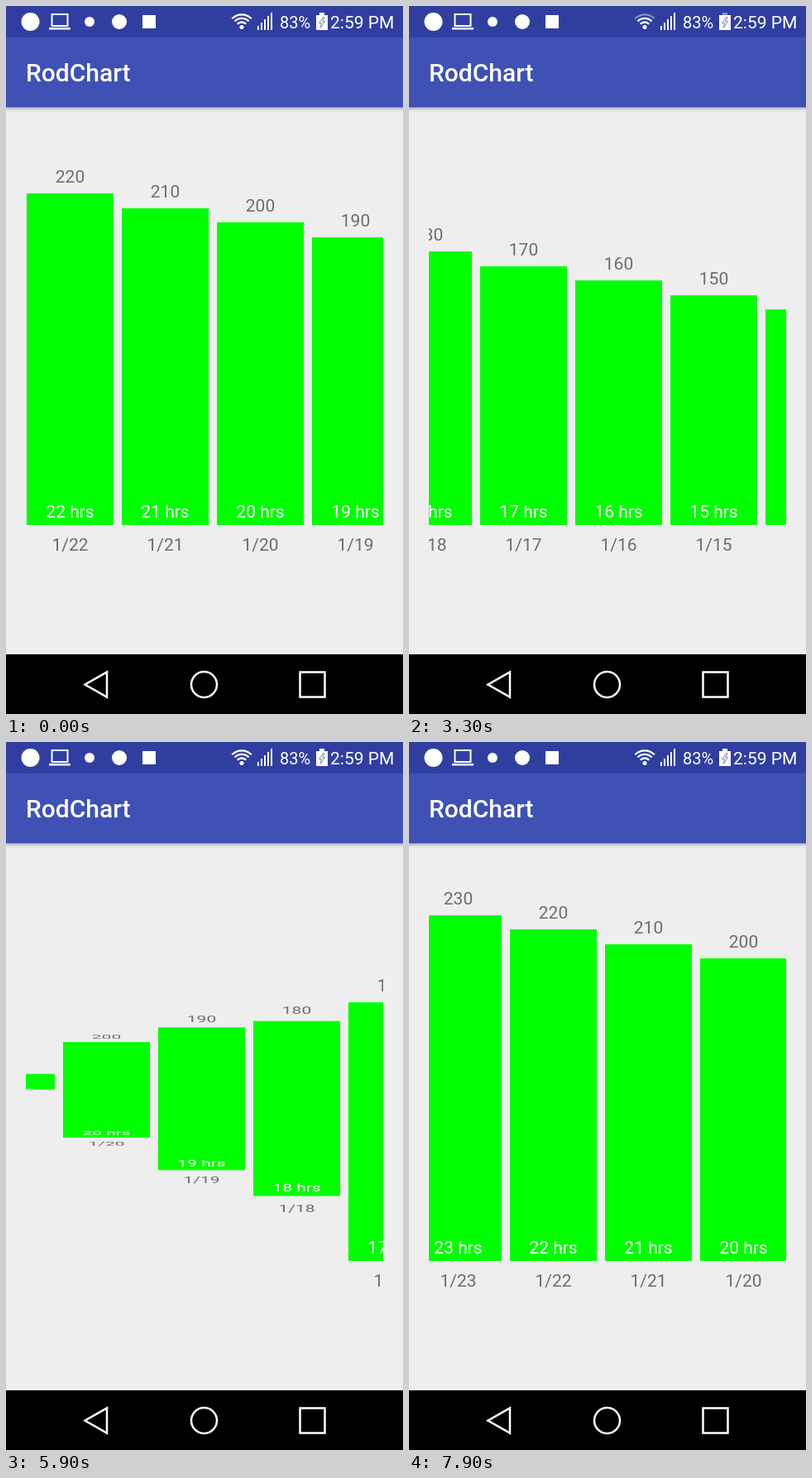
Write an HTML page that moves like this. It is 480 px wide and 854 px high and loops after 8000 ms.

```html
<!DOCTYPE html>
<html lang="en">
<head>
<meta charset="utf-8">
<title>Bar chart</title>
<style>
  html, body { margin: 0; width: 100%; height: 100%; overflow: hidden; background: #eee; }
  svg { display: block; width: 480px; height: 854px; }
  text { font: 21px Roboto, sans-serif; }
  .bar text { text-anchor: middle; fill: #6d6d6d; }
  .bar .hours { fill: #fff; }
  .line { fill: none; stroke: #fff; }
</style>
</head>
<body>
<svg viewBox="0 0 480 854">
  <defs>
    <clipPath id="viewport"><rect x="24" y="146" width="432" height="525"/></clipPath>
    <linearGradient id="shade" x2="0" y2="1">
      <stop stop-opacity=".32"/><stop offset=".45" stop-opacity=".1"/><stop offset="1" stop-opacity="0"/>
    </linearGradient>
  </defs>
  <rect width="480" height="854" fill="#eee"/>

  <g clip-path="url(#viewport)">
    <g id="bars"></g>
    <path id="glow" d="M0 146H14Q28 408.5 14 671H0z" fill="#3f51b5"/>
  </g>

  <rect y="122" width="480" height="6" fill="url(#shade)"/>
  <rect y="38" width="480" height="84" fill="#3f51b5"/>
  <rect width="480" height="38" fill="#303f9f"/>
  <text x="24" y="91" fill="#fff" style="font-size:30px;font-weight:500">RodChart</text>

  <g fill="#fff">
    <circle cx="29.500" cy="19" r="11"/>
    <path d="M52 26h26v2.500H52z"/>
    <rect class="line" x="55.500" y="10" width="19" height="14" stroke-width="2"/>
    <circle cx="101" cy="19" r="6"/>
    <circle cx="137" cy="19" r="9"/>
    <rect x="165" y="11" width="16" height="16"/>
    <circle cx="285" cy="25.500" r="2.500"/>
    <g class="line" stroke-width="2.300">
      <path d="M279.700 21.700a7.500 7.500 0 0 1 10.600 0M276.500 18.500a12 12 0 0 1 17 0"/>
      <path id="wifi" d="M273.300 15.300a16.500 16.500 0 0 1 23.400 0"/>
    </g>
    <path d="M304 29v-5h2v5zM308 29v-9h2v9zM312 29v-13h2v13zM316 29v-17h2v17zM320 29v-21h2v21z"/>
    <text x="331" y="27" style="font-size:20px">83%</text>
    <rect id="tip" x="379" y="8" width="6" height="3"/>
    <rect x="375" y="11" width="14" height="18"/>
    <path d="M383.500 13.500l-5 7h3l-1.500 6 5.500-8h-3l2.500-5z" fill="none" stroke="#7d86bf"/>
    <text x="392" y="27">2:59 PM</text>
  </g>

  <rect y="782" width="480" height="72"/>
  <g class="line" stroke-width="2.500">
    <path d="M122 803.500v30L95.500 818.500z"/>
    <circle cx="239.500" cy="818.500" r="15.500"/>
    <rect x="355.500" y="803.500" width="30" height="30"/>
  </g>
</svg>

<script>
const LOOP = 8000, STEP = 100, GROW = 800;
const COUNT = 24, PITCH = 115, WIDTH = 105, LEFT = 24, MIDDLE = 408.5, BASE = 626;

// Scroll offset of the list: [time, px]
const path = [
  [0, 229], [1600, 229], [1700, 90], [1780, 0], [2600, 0], [2900, 420], [3150, 715],
  [3300, 743], [3500, 1250], [3750, 2050], [3950, 2130], [4020, 2040], [4093, 1830],
  [4166, 1715], [4244, 1600], [4290, 1485], [4300, 1397], [4400, 1150], [4550, 1000],
  [4800, 880], [5380, 850], [5426, 795], [5500, 680], [5594, 565], [5785, 450],
  [5900, 415], [6340, 415], [6410, 335], [6506, 220], [6579, 105], [6630, 0],
  [7600, 0], [7700, 30], [7800, 95], [7900, 132], [8000, 132]
];
const blinks = [100, 600, 1100, 1700, 2200, 2700, 3200, 3700, 4200, 4700, 5200, 5700, 6400, 7100];

const secant = i => (path[i + 1][1] - path[i][1]) / (path[i + 1][0] - path[i][0]);
const slopes = path.map((_, i) => {
  if (!i || i === path.length - 1) return 0;
  const a = secant(i - 1), b = secant(i);
  return a * b > 0 ? 2 * a * b / (a + b) : 0;
});

// Monotone cubic through the path points
function scrollAt(t) {
  let i = 0;
  while (i < path.length - 2 && t >= path[i + 1][0]) i++;
  const [t0, s0] = path[i], [t1, s1] = path[i + 1];
  const d = t1 - t0, u = (t - t0) / d, v = 1 - u;
  return v * v * ((1 + 2 * u) * s0 + u * d * slopes[i])
       + u * u * ((3 - 2 * u) * s1 - v * d * slopes[i + 1]);
}

function make(parent, tag, attrs, text = '') {
  const el = document.createElementNS('http://www.w3.org/2000/svg', tag);
  for (const key in attrs) el.setAttribute(key, attrs[key]);
  el.textContent = text;
  return parent.appendChild(el);
}

const byId = id => document.getElementById(id);
const bars = Array.from({ length: COUNT }, (_, i) => {
  const hours = COUNT - i, x = WIDTH / 2;
  const top = Math.round(BASE - 15 - 17.5 * hours) - MIDDLE;
  const el = make(byId('bars'), 'g', { class: 'bar' });
  make(el, 'rect', { y: top, width: WIDTH, height: BASE - MIDDLE - top, fill: hours > 10 ? '#0f0' : '#f00' });
  make(el, 'text', { x, y: top - 13.5 }, hours * 10);
  make(el, 'text', { x, y: 617 - MIDDLE, class: 'hours' }, hours + ' hrs');
  make(el, 'text', { x, y: 657 - MIDDLE }, '1/' + hours);
  return { el, x: i * PITCH, starts: [] };
});

// A bar grows each time it re-enters from the left
for (let t = 2; t < LOOP; t += 2) {
  const before = scrollAt(t - 2), now = scrollAt(t);
  for (const bar of bars) {
    const edge = bar.x + WIDTH;
    if (before >= edge && now < edge) bar.starts.push(t);
  }
}

function draw(t) {
  const scroll = Math.round(scrollAt(t));
  for (const { el, x, starts } of bars) {
    const start = starts.filter(s => s <= t).pop() ?? -GROW;
    const p = Math.min(1, (t - start) / GROW);
    const scale = (1 - Math.cos(Math.PI * p)) / 2;
    const left = x - scroll;
    const shown = left > -WIDTH && left < 432 && scale > 0.002;
    el.setAttribute('display', shown ? 'inline' : 'none');
    el.setAttribute('transform', `translate(${LEFT + left} ${MIDDLE}) scale(1 ${scale})`);
  }
  const fade = t >= 6630 ? Math.max(0, (7100 - t) / 100) : 0;
  byId('glow').setAttribute('opacity', Math.min(0.2, 0.07 * fade));
  byId('glow').setAttribute('transform', `translate(${LEFT} 0) scale(${Math.min(2, fade)} 1)`);
  byId('tip').setAttribute('opacity', blinks.filter(b => b <= t).length % 2 ? 0.4 : 1);
  byId('wifi').setAttribute('opacity', t >= 1400 && t < 5300 ? 0.4 : 1);
}

const origin = performance.now();
function tick() {
  const t = (performance.now() - origin) % LOOP;
  draw(Math.floor(t / STEP) * STEP);
  requestAnimationFrame(tick);
}
tick();
</script>
</body>
</html>
```
